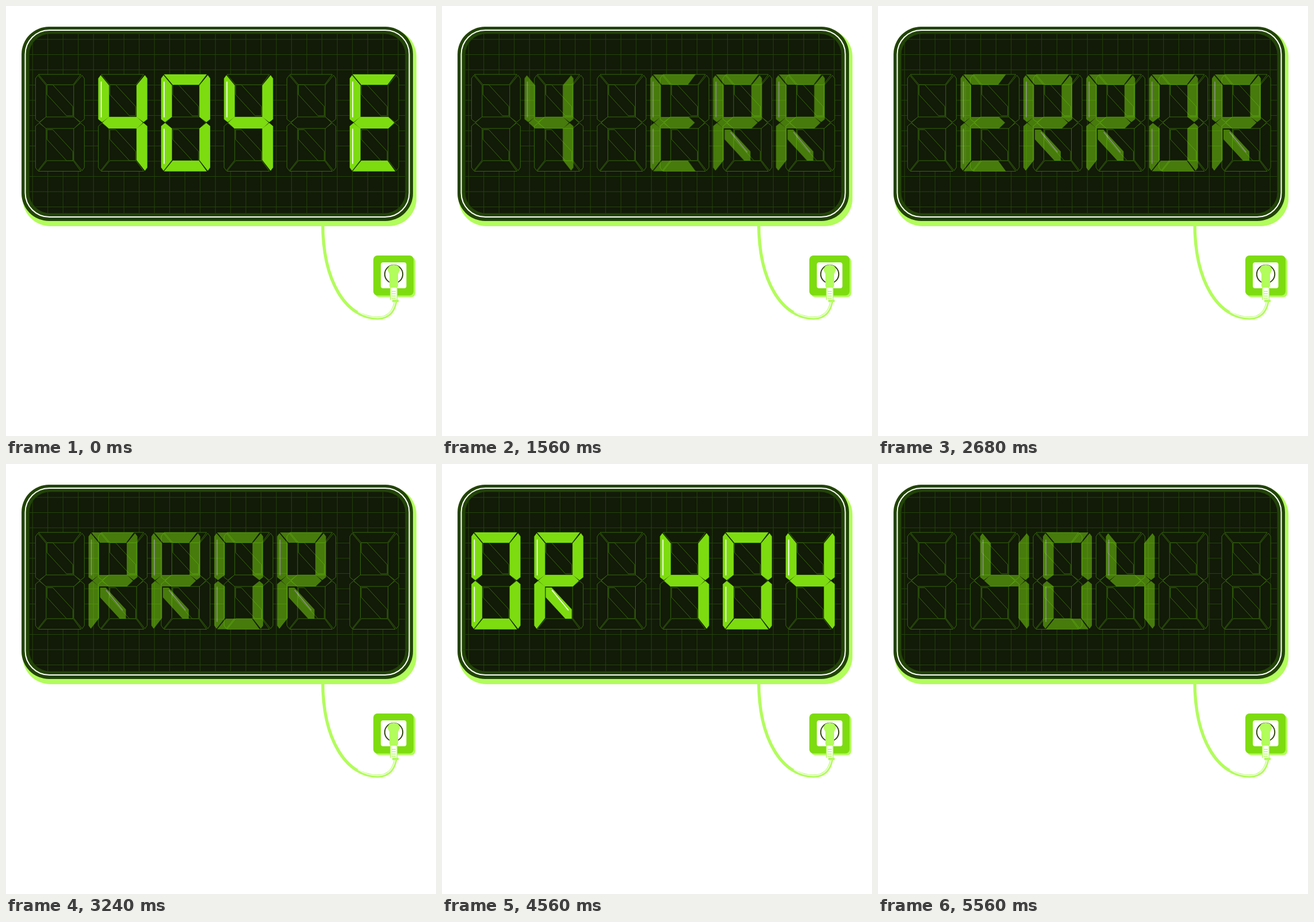
These frames come from a looping animation (748 px wide and 748 px high, 5600 ms). An HTML page:

```html
<!DOCTYPE html>
<html lang="en">
<head>
<meta charset="utf-8">
<title>404 error display</title>
<style>
  html, body { margin: 0; width: 100%; height: 100%; overflow: hidden; background: #fff; }
  svg { display: block; width: 100vw; height: 100vh; }
  .lit { fill: #7ddc10; }
  .pale { fill: #b2fc5c; }
  .ghost { fill: #121a08; stroke: #35690a; stroke-width: 1; }
  .grid { fill: none; stroke: #23440a; stroke-width: 1; }
  .shine { fill: none; stroke: #fff; stroke-width: 1.7; stroke-linecap: round; }
</style>
</head>
<body>
<svg viewBox="0 0 748 748">
  <defs>
    <clipPath id="panel"><rect x="40.5" y="48.5" width="654" height="312" rx="36"/></clipPath>
  </defs>

  <!-- cable -->
  <g fill="none">
    <path d="M551 378C551 480 592 543 646 543C667 543 676 529 678 512" stroke="#b2fc5c" stroke-width="5.4"/>
    <path d="M612 531.5Q628 542 647 542C666 542 675 528 677 513" stroke="#fff" stroke-width="1.4"/>
  </g>

  <!-- board -->
  <rect class="pale" x="29" y="40" width="685" height="343" rx="48"/>
  <rect x="27" y="36" width="681" height="338" rx="48" fill="#224407"/>
  <rect x="33.5" y="42" width="668" height="325" rx="42" fill="none" stroke="#fff" stroke-width="2"/>
  <rect x="40.5" y="48.5" width="654" height="312" rx="36" fill="#121a08"/>
  <g id="grid" class="grid" clip-path="url(#panel)"></g>
  <g id="ghosts"></g>
  <g id="row"></g>

  <!-- socket and plug -->
  <rect class="pale" x="642" y="437" width="70" height="69.5" rx="7"/>
  <rect class="lit" x="639" y="434" width="70" height="69.5" rx="7"/>
  <rect x="652" y="446" width="44.5" height="45" rx="4" fill="#fff"/>
  <circle cx="674.5" cy="466.5" r="15.7" fill="#fff" stroke="#33480f" stroke-width="2"/>
  <path class="pale" d="M664 460Q664 450 674.5 450Q685 450 685 460L682 466V488H667V466Z"/>
  <path class="pale" d="M668 487H681V511H683V515H672V511H668Z"/>
  <rect x="669.5" y="490" width="10" height="21" fill="#fff"/>
  <path d="M671 496.5H678M671 500.5H678M671 504.5H678M671 508.5H678" stroke="#b2fc5c" stroke-width="1.6"/>
</svg>

<script>
const TEXT = ' 404 ERROR';
const CELLS = 6, LEFT = 51.3, PITCH = 109.35, WIDTH = 85;
const FRAME = 40, STEP = 560, REST = 400, SLIDE = 160, LOOP = STEP * TEXT.length;

const mirror = points => points.map(([x, y]) => [WIDTH - x, y]);
const upper = [[0, 126], [4, 120.5], [18.5, 138], [18.5, 193], [6.5, 202], [0, 197]];
const lower = [[0, 209], [6.5, 203.5], [18.5, 213], [18.5, 268], [4, 286.5], [0, 281]];
const leg = [[20, 215], [30, 215], [65, 253], [65, 269], [54, 269], [20, 232]];

const SEGMENTS = {
  a: [[5, 119], [79, 119], [65.5, 137], [20, 137]],
  b: mirror(upper),
  c: mirror(lower),
  d: [[20, 269], [65.5, 269], [79, 287.5], [5, 287.5]],
  e: lower,
  f: upper,
  g: [[7, 203], [18, 193], [67, 193], [77.5, 203], [67, 213], [18, 213]],
  k: leg,
  h: leg.map(([x, y]) => [x, y - 78])
};
const GLYPHS = { ' ': '', 4: 'bcfg', 0: 'abcdef', O: 'abcdef', E: 'adefg', R: 'abefgk' };
const SHINES = { f: 'M5 132V193', e: 'M5 214V274', k: 'M31 220L59 254' };

const byId = id => document.getElementById(id);

function add(parent, tag, attrs) {
  const node = document.createElementNS('http://www.w3.org/2000/svg', tag);
  for (const name in attrs) node.setAttribute(name, attrs[name]);
  return parent.appendChild(node);
}

function addSegments(parent, keys, cls) {
  for (const key of keys) add(parent, 'polygon', { points: SEGMENTS[key].join(' '), class: cls });
}

function addCell(parent, index) {
  return add(parent, 'g', { transform: `translate(${LEFT + index * PITCH})` });
}

for (let x = 46.2; x < 695; x += 26.5) add(byId('grid'), 'path', { d: `M${x} 48V361` });
for (let y = 58; y < 361; y += 26.5) add(byId('grid'), 'path', { d: `M40 ${y}H695` });

for (let i = 0; i < CELLS; i++) {
  const cell = addCell(byId('ghosts'), i);
  add(cell, 'rect', { x: 1, y: 119, width: 83, height: 168, rx: 5, fill: '#121a08' });
  addSegments(cell, Object.keys(SEGMENTS), 'ghost');
}

const row = byId('row');
const letters = Array.from({ length: TEXT.length + CELLS }, (_, i) => {
  const char = TEXT[i % TEXT.length];
  const letter = addCell(row, i);
  addSegments(letter, GLYPHS[char], 'lit');
  for (const key in SHINES) {
    if (GLYPHS[char].includes(key) && !(char === 'R' && key === 'e')) {
      add(letter, 'path', { d: SHINES[key], class: 'shine' });
    }
  }
  return letter;
});

const ease = u => u * u * (3 - 2 * u);

function draw(time) {
  const t = Math.floor((time % LOOP + 0.5) / FRAME) * FRAME % LOOP;
  const first = Math.floor(t / STEP);
  const u = Math.max(0, (t % STEP - REST) / SLIDE);
  const moving = u > 0;
  row.setAttribute('transform', `translate(${-(first + ease(u)) * PITCH})`);
  row.setAttribute('opacity', moving ? 0.5 : 1);
  // The leaving letter is dropped for the slide; the new one appears once it ends.
  letters.forEach((letter, i) => {
    const shown = i >= first + (moving ? 1 : 0) && i < first + CELLS;
    letter.setAttribute('visibility', shown ? 'visible' : 'hidden');
  });
}

let start;
function tick(now) {
  start ??= now;
  draw(now - start);
  requestAnimationFrame(tick);
}
draw(0);
requestAnimationFrame(tick);
</script>
</body>
</html>
```
